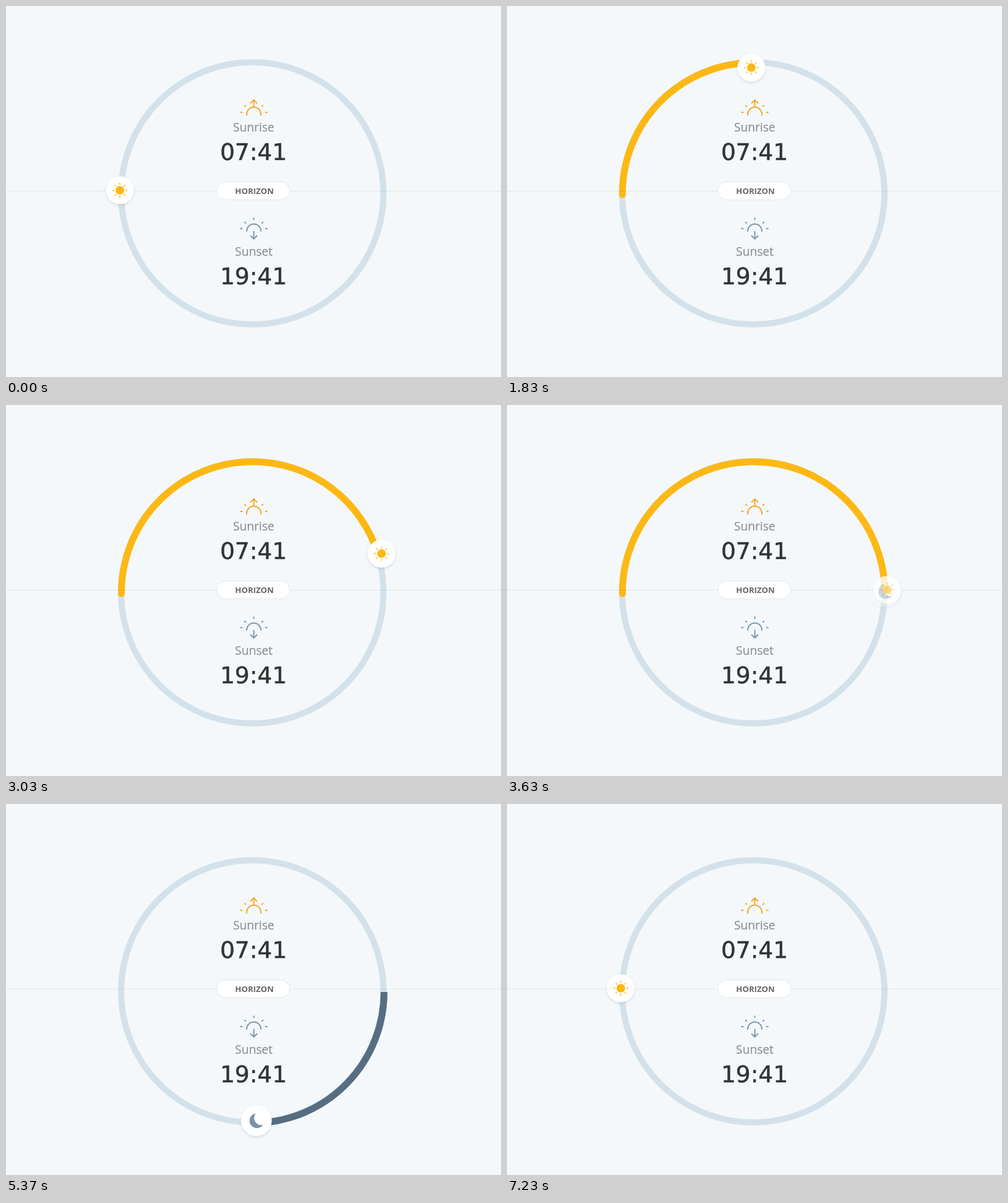
These frames come from a looping animation (800 by 600 pixels, 7.38 s). An HTML page:

```html
<!DOCTYPE html>
<html lang="en">
<head>
<meta charset="utf-8">
<title>Sunrise and sunset</title>
<style>
  html, body { margin: 0; width: 100%; height: 100%; overflow: hidden; background: #f4f8fb; }
  svg { display: block; width: 800px; height: 600px; }
  text { text-anchor: middle; font-family: "Open Sans", "Noto Sans", sans-serif; }
  .label { font-size: 19.2px; fill: #8e8e8e; stroke: #8e8e8e; stroke-width: .2; }
  .time { font: 37.5px "DejaVu Sans", sans-serif; fill: #333; stroke: #333; stroke-width: .5; }
  .line { fill: none; stroke-width: 2; stroke-linecap: round; stroke-linejoin: round; }
  .arc { fill: none; stroke-width: 11; stroke-linecap: round; }
  .disc { fill: #fff; filter: drop-shadow(0 2px 2px rgba(40, 60, 80, .14)); }
</style>
</head>
<body>
<svg viewBox="0 0 800 600">
  <circle cx="398" cy="303" r="212" fill="none" stroke="#d3e1ea" stroke-width="10"/>
  <path id="day" class="arc" stroke="#fdb813" pathLength="180" d="M186.5 305V303.7A212 212 0 0 1 610.5 303.7"/>
  <path id="night" class="arc" stroke="#566d82" pathLength="180" d="M611 305V304A212 212 0 0 1 187 304"/>
  <path d="M0 299.5H800" stroke="#000" stroke-opacity=".07"/>

  <rect x="340.5" y="284.5" width="118" height="29" rx="14.5" fill="#fff" stroke="#e1e6e9"/>
  <text x="401.5" y="304" font-size="13.2" font-weight="700" fill="#666">HORIZON</text>

  <path class="line" stroke="#f5a82a" d="M389 176.5V175a11.5 11.5 0 0 1 23 0v1.5M400.5 163.5V152.5M395.5 157l5-5 5 5
    M379.3 172h2.2M419.7 172h2.2M386 161l1.3 1.3M415 161l-1.3 1.3"/>
  <text class="label" x="400.3" y="203">Sunrise</text>
  <text class="time" x="400" y="249">07:41</text>

  <path class="line" stroke="#7f98ab" d="M389 364a11.5 11.5 0 0 1 23 0M400.5 364.5V376.5M395.5 371.8l5 5 5-5
    M400.5 343v2.2M379.3 360h2.2M419.7 360h2.2M385.8 349.7l1.5 1.2M415.2 349.7l-1.5 1.2"/>
  <text class="label" x="400.5" y="404">Sunset</text>
  <text class="time" x="400" y="450">19:41</text>

  <g id="sun">
    <circle class="disc" r="22.6"/>
    <circle r="7" fill="#fdb813"/>
    <g id="rays" stroke="#fdb813" stroke-width="1.7"></g>
  </g>
  <g id="moon">
    <circle class="disc" r="25"/>
    <path fill="#7a93a9" d="M-1-11.5A12 12 0 1 0 11 7A11.7 11.7 0 0 1-1-11.5Z"/>
  </g>
</svg>
<script>
const LOOP = 7380;
const $ = id => document.getElementById(id);
const [day, night, sun, moon] = ['day', 'night', 'sun', 'moon'].map($);

for (let a = 0; a < 360; a += 45) {
  $('rays').innerHTML += `<path d="M9 0h2.7" transform="rotate(${a})"/>`;
}

const track = d => {
  const path = document.createElementNS('http://www.w3.org/2000/svg', 'path');
  path.setAttribute('d', d);
  const length = path.getTotalLength();
  return k => path.getPointAtLength(k * length);
};
const sunTrack = track('M184 298C176 32 617 34 615 301');
const moonTrack = track('M611 301.5C606 581 188 583 189 303');

const ramp = (t, from, to) => Math.min(1, Math.max(0, (t - from) / (to - from)));

// cubic-bezier(x1, 0, x2, 1)
function ease(x, x1, x2) {
  let lo = 0, hi = 1, p;
  for (let i = 0; i < 24; i++) {
    p = (lo + hi) / 2;
    const q = 1 - p;
    if (3 * p * q * q * x1 + 3 * p * p * q * x2 + p ** 3 < x) lo = p; else hi = p;
  }
  return p * p * (3 - 2 * p);
}

function place(el, pt, opacity) {
  el.setAttribute('transform', `translate(${pt.x} ${pt.y})`);
  el.setAttribute('opacity', opacity);
}

function sweep(arc, degrees, opacity) {
  arc.setAttribute('stroke-dasharray', `${degrees} 400`);
  arc.setAttribute('opacity', opacity);
}

const degrees = (y, x) => Math.atan2(Math.max(y, 0.01), x) * 180 / Math.PI;

function draw(t) {
  const returning = t > 5000;
  const s = sunTrack(returning ? 0 : ease(ramp(t, 0, 3750), .32, .66));
  const m = moonTrack(ease(ramp(t, 3620, 7160), 1 / 3, 2 / 3));
  const dawn = 1 - ramp(t, 7110, 7225);

  place(sun, s, returning ? ramp(t, 7080, 7220) : 1 - ramp(t, 3585, 3735));
  place(moon, m, ramp(t, 3590, 3710) * dawn);
  sweep(day, degrees(304 - s.y, 398.5 - s.x), 1 - ramp(t, 3630, 3735));
  sweep(night, degrees(m.y - 304, m.x - 399), ramp(t, 3660, 3750) * dawn);
}

function frame() {
  draw(performance.now() % LOOP);
  requestAnimationFrame(frame);
}
frame();
</script>
</body>
</html>
```
